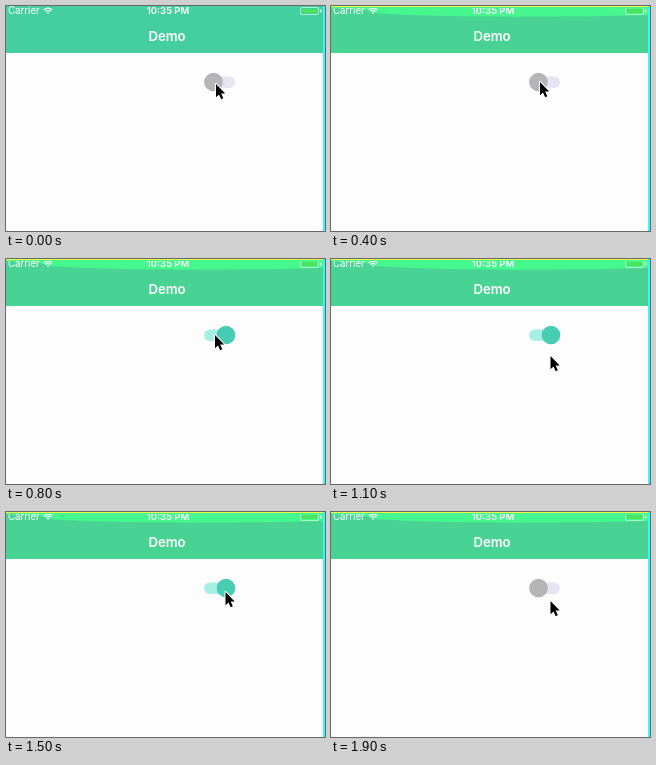
An HTML page with a canvas that plays this animation: 319 by 225 pixels, repeating every 2000 ms.

```html
<!DOCTYPE html>
<html lang="en">
<head>
<meta charset="utf-8">
<title>Switch demo</title>
<style>
html, body { margin: 0; width: 100%; height: 100%; overflow: hidden; background: #fdfdfe; }
canvas { display: block; width: 319px; height: 225px; }
</style>
</head>
<body>
<canvas id="stage" width="319" height="225"></canvas>
<script>
const ctx = document.getElementById('stage').getContext('2d');
const W = 319, H = 225, LOOP = 2000, STEP = 100;
const FONT = 'Inter, Roboto, sans-serif';
const ON_AT = 700, OFF_AT = 1700;

// Smooth 0 to 1 between two times
function ease(t, from, to) {
  const k = Math.min(1, Math.max(0, (t - from) / (to - from)));
  return k * k * (3 - 2 * k);
}

// Short overshoot that peaks at a given time
function bump(t, peak) {
  return Math.max(0, 1 - Math.abs(t - peak) / 100);
}

function mix(a, b, k) {
  return `rgb(${a.map((v, i) => Math.round(v + (b[i] - v) * k)).join(',')})`;
}

function rect(color, x, y, w, h, r = 0) {
  ctx.fillStyle = color;
  ctx.beginPath();
  ctx.roundRect(x, y, w, h, r);
  ctx.fill();
}

function label(text, x, y, size, weight, align = 'center') {
  ctx.font = `${weight} ${size}px ${FONT}`;
  ctx.textAlign = align;
  ctx.fillStyle = '#fff';
  ctx.fillText(text, x, y);
}

function drawWifi(x, y) {
  ctx.strokeStyle = '#fff';
  ctx.lineWidth = 1.2;
  for (const r of [1, 3.4, 5.8]) {
    ctx.beginPath();
    ctx.arc(x, y, r, -Math.PI * 0.76, -Math.PI * 0.24);
    ctx.stroke();
  }
}

function drawBattery() {
  ctx.strokeStyle = '#d8ffe9';
  ctx.lineWidth = 0.7;
  ctx.beginPath();
  ctx.roundRect(294.5, 1.5, 18, 7, 1.5);
  ctx.stroke();
  rect('#4be35a', 296, 3, 15, 4);
  rect('#d8ffe9', 314, 3.5, 1.5, 3);
}

function drawBand() {
  ctx.fillStyle = '#45f78d';
  ctx.beginPath();
  ctx.moveTo(0, 0);
  ctx.lineTo(W, 0);
  ctx.lineTo(W, 9);
  ctx.bezierCurveTo(230, 11, 110, 12, 45, 7);
  ctx.quadraticCurveTo(32, 2, 0, 2);
  ctx.fill();
}

function drawHeader(t) {
  const lit = t >= STEP;
  rect(lit ? '#48d394' : '#45cfa0', 0, 0, W, 47);
  if (lit) drawBand();
  label('Carrier', 2, 8.3, 9.7, 400, 'left');
  label('10:35 PM', 162, 8.3, 9.5, 600);
  drawWifi(42, 8);
  drawBattery();
  if (lit) {
    rect('#45f78d', 0, 1, W, 1);
    rect('#eff84a', 0, 0, W, 1);
  }
  label('Demo', 161, 34.5, 13.2, 600);
}

function drawSwitch(t) {
  const on = ease(t, ON_AT - 200, ON_AT) - ease(t, OFF_AT - 200, OFF_AT);
  const x = 207.5 + 12.5 * on + 2.5 * (bump(t, ON_AT) - bump(t, OFF_AT));
  rect(mix([230, 228, 242], [166, 239, 228], on), 198, 70.5, 31, 11.5, 5.75);
  ctx.fillStyle = mix([181, 181, 184], [73, 205, 178], on);
  ctx.beginPath();
  ctx.arc(x, 76, 9.3, 0, Math.PI * 2);
  ctx.fill();
}

function drawCursor(t) {
  const settle = 1 - ease(t, 0, 100);
  const leave = ease(t, 800, 1100);
  const back = ease(t, 1100, 1300);
  const away = ease(t, 1700, 1900);
  const arrow = new Path2D('M0 0V13.2L3 10.4L5.2 15.2L7.3 14.2L5.2 9.6H9.2Z');
  ctx.save();
  ctx.translate(209 + settle + 10.5 * leave, 76 + 2 * settle + 21 * leave - 17 * back + 9 * away);
  ctx.lineJoin = 'round';
  ctx.lineWidth = 2;
  ctx.strokeStyle = '#fff';
  ctx.stroke(arrow);
  ctx.fillStyle = '#000';
  ctx.fill(arrow);
  ctx.restore();
}

function draw(now) {
  const t = Math.floor((now % LOOP) / STEP) * STEP;
  rect('#fdfdfe', 0, 0, W, H);
  drawHeader(t);
  rect('#30fbfb', W - 2, 0, 2, H);
  drawSwitch(t);
  drawCursor(t);
}

const start = performance.now();
function loop() {
  draw(performance.now() - start);
  requestAnimationFrame(loop);
}
loop();
</script>
</body>
</html>
```
